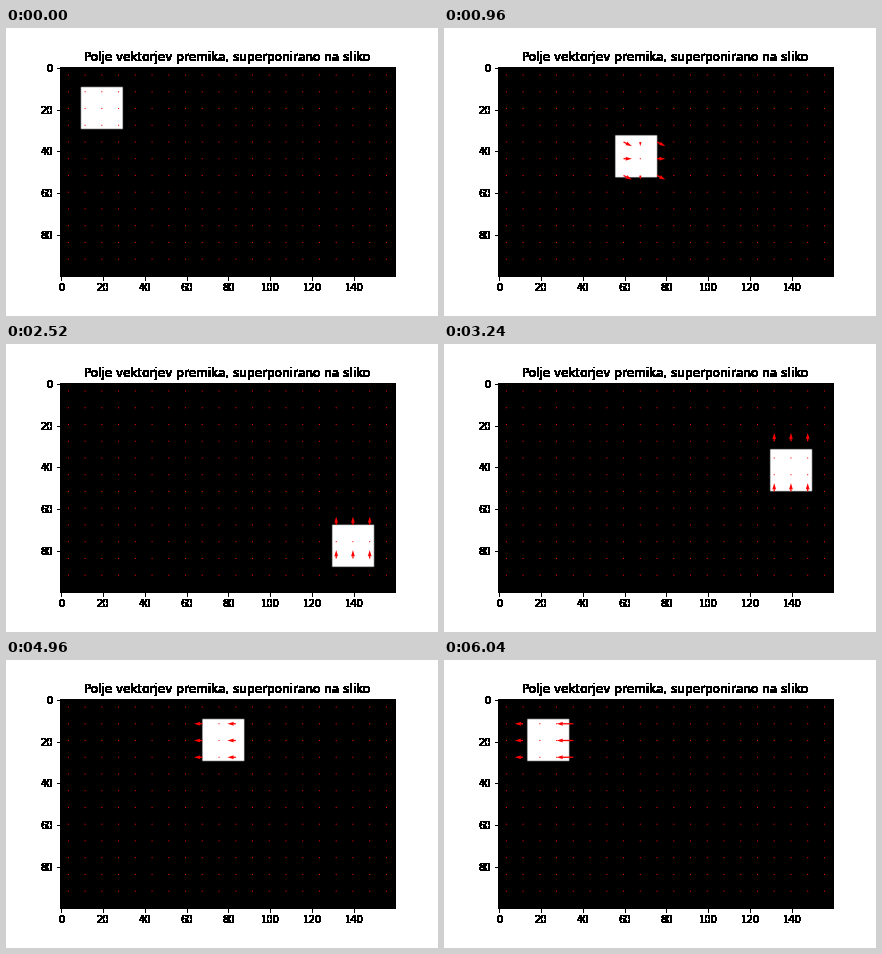
These frames come from a looping animation (432 px wide and 288 px high, 6.08 s). A matplotlib script:

```python
import numpy as np
import matplotlib.pyplot as plt
from matplotlib.animation import FuncAnimation

W, H, SIDE, BLOCK = 160, 100, 20, 8
FRAMES, INTERVAL = 152, 40
CROSS = [(-1, 0), (1, 0), (0, -1), (0, 1)]
DIAGONAL = [(-1, -1), (1, -1), (-1, 1), (1, 1)]


def corner(k):
    """Top-left corner of the square at step k: diagonal, up, then left."""
    if k <= 60:
        return 10 + 2 * k, 10 + k
    if k <= 91:
        return 130, 70 - 2 * (k - 61)
    return 130 - 2 * (k - 92), 10


def picture(k):
    x, y = corner(k)
    img = np.zeros((H, W))
    img[y:y + SIDE, x:x + SIDE] = 1
    return img


def search(before, block, x, y):
    """Logarithmic search for the block's motion since the earlier picture."""
    def cost(dx, dy):
        u, v = x + dx, y + dy
        if not (0 <= u <= W - BLOCK and 0 <= v <= H - BLOCK):
            return np.inf
        return np.abs(before[v:v + BLOCK, u:u + BLOCK] - block).sum()

    cx = cy = 0
    best = cost(0, 0)
    step = 4
    while step and best > 0:
        around = CROSS if step > 1 else CROSS + DIAGONAL
        trials = [(cx + step * i, cy + step * j) for i, j in around]
        costs = [cost(*t) for t in trials]
        i = int(np.argmin(costs))
        if costs[i] < best:
            best = costs[i]
            cx, cy = trials[i]
            if step > 1:
                continue
        step //= 2
    return -cx, -cy


def motion(before, after):
    field = np.zeros((2, H // BLOCK, W // BLOCK))
    for r in range(H // BLOCK):
        for c in range(W // BLOCK):
            x, y = c * BLOCK, r * BLOCK
            block = after[y:y + BLOCK, x:x + BLOCK]
            field[:, r, c] = search(before, block, x, y)
    return field


def harden(img, dpi):
    """Make every touched pixel fully opaque, for crisp heavy lettering."""
    out = img.copy()
    out[..., 3] = img[..., 3] > 0
    return out, 0, 0


plt.rcParams.update({"font.family": "DejaVu Sans", "font.size": 10})
fig = plt.figure(figsize=(6, 4), dpi=72, facecolor="white")
fig.subplots_adjust(left=0.125, right=0.9, bottom=0.125, top=0.88)
ax = fig.add_subplot()
ax.set_title("Polje vektorjev premika, superponirano na sliko")
ax.set_agg_filter(harden)

image = ax.imshow(picture(0), cmap="gray", vmin=0, vmax=1)
mid = (BLOCK - 1) / 2
gx, gy = np.meshgrid(np.arange(W // BLOCK) * BLOCK + mid,
                     np.arange(H // BLOCK) * BLOCK + mid)
still = np.zeros((2,) + gx.shape)
arrows = ax.quiver(gx, gy, *still, color="red", angles="xy",
                   scale_units="xy", scale=0.5)


def update(n):
    k = max(n - 1, 0)
    now = picture(k)
    image.set_data(now)
    arrows.set_UVC(*(motion(now, picture(k + 1)) if n else still))
    return image, arrows


anim = FuncAnimation(fig, update, frames=FRAMES, interval=INTERVAL,
                     repeat=True, repeat_delay=0)
plt.show()
```
